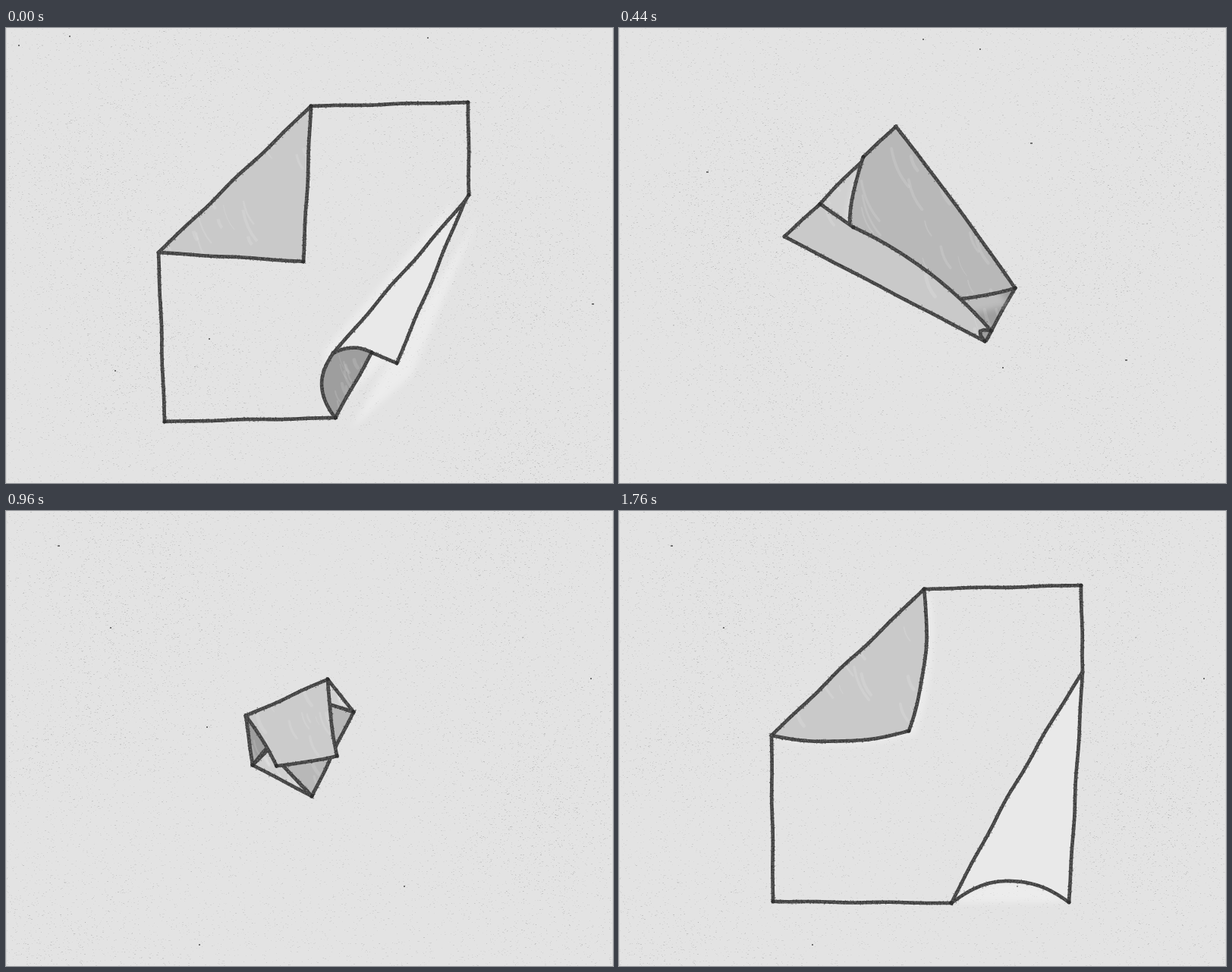
Animation of 800x600 px, one loop 1.8 s. Source, as an HTML page with a canvas:

```html
<!DOCTYPE html>
<html lang="en">
<head>
<meta charset="utf-8">
<title>Folding paper</title>
<style>
  html, body { margin: 0; width: 100%; height: 100%; overflow: hidden; background: #e2e2e2; }
  canvas { display: block; width: 800px; height: 600px; }
</style>
</head>
<body>
<canvas id="stage" width="800" height="600"></canvas>
<script>
const LOOP = 1800, WALLS = 4;
const PAPER = '#e2e2e2', LIFTED = '#e9e9e9', LIGHT = '#d0d0d0';
const BACK = '#c9c9c9', MID = '#b8b8b8', SHADE = '#9e9e9e', INK = '#474747';
const ctx = document.getElementById('stage').getContext('2d');
let rand = seeded(1);

function seeded(seed) {
  let s = seed * 7919 + 17;
  return () => {
    s = (s + 0x6D2B79F5) | 0;
    let t = Math.imul(s ^ (s >>> 15), 1 | s);
    t = (t + Math.imul(t ^ (t >>> 7), 61 | t)) ^ t;
    return ((t ^ (t >>> 14)) >>> 0) / 4294967296;
  };
}

const spread = n => (rand() - 0.5) * 2 * n;
const mix = (a, b, p) => a + (b - a) * p;
const mixPt = (a, b, p) => [0, 1, 2].map(i => mix(a[i] || 0, b[i] || 0, p));
const mixAll = (from, to, p) => from.map((pt, i) => mixPt(pt, to[i], p));
const bent = (pt, bulge) => [pt[0], pt[1], bulge];

// A point is [x, y, bulge]; bulge bends the edge to the next point, to the right of travel.
function control(a, b) {
  const dx = b[0] - a[0], dy = b[1] - a[1];
  const k = 2 * (a[2] || 0) / (Math.hypot(dx, dy) || 1);
  return [(a[0] + b[0]) / 2 - dy * k, (a[1] + b[1]) / 2 + dx * k];
}

function trace(pts) {
  ctx.beginPath();
  ctx.moveTo(pts[0][0], pts[0][1]);
  pts.forEach((a, i) => {
    const b = pts[(i + 1) % pts.length];
    ctx.quadraticCurveTo(...control(a, b), b[0], b[1]);
  });
  ctx.closePath();
}

// Charcoal stroke: a slightly wavering line with rough grain on top.
function inkEdge(a, b, width) {
  const c = control(a, b);
  const len = Math.hypot(b[0] - a[0], b[1] - a[1]);
  const n = Math.max(2, Math.round(len / 4));
  const phase = rand() * 6, amp = Math.min(0.6, len / 200);
  const line = [];
  for (let i = 0; i <= n; i++) {
    const t = i / n, s = 1 - t;
    const w = amp * Math.sin(phase + t * len / 17) * Math.sin(Math.PI * t);
    line.push([0, 1].map(j => s * s * a[j] + 2 * s * t * c[j] + t * t * b[j] + w));
  }
  ctx.strokeStyle = INK;
  ctx.lineWidth = width;
  ctx.beginPath();
  line.forEach(p => ctx.lineTo(...p));
  ctx.stroke();
  for (const p of line) {
    for (let j = 0; j < 5; j++) {
      const dark = j < 3, r = dark ? width * 0.62 : 1.6;
      ctx.fillStyle = dark ? 'rgba(50,50,50,.6)' : 'rgba(150,150,150,.4)';
      ctx.fillRect(p[0] + spread(r) - 0.5, p[1] + spread(r) - 0.5, 1.2, 1.2);
    }
  }
  ctx.fillStyle = 'rgba(25,25,25,.55)';
  ctx.beginPath();
  ctx.arc(a[0], a[1], width * 0.55, 0, 7);
  ctx.fill();
}

function ink(pts, closed, width = 4.6) {
  ctx.lineCap = ctx.lineJoin = 'round';
  const n = pts.length - (closed ? 0 : 1);
  for (let i = 0; i < n; i++) inkEdge(pts[i], pts[(i + 1) % pts.length], width);
}

function streaks(pts) {
  const xs = pts.map(p => p[0]), ys = pts.map(p => p[1]);
  const x0 = Math.min(...xs), y0 = Math.min(...ys);
  const w = Math.max(...xs) - x0, h = Math.max(...ys) - y0;
  ctx.save();
  ctx.clip();
  ctx.strokeStyle = 'rgba(255,255,255,.12)';
  for (let i = 0; i < 24; i++) {
    const x = x0 + rand() * w, y = y0 + rand() * h, len = 8 + rand() * h * 0.2;
    ctx.lineWidth = 1 + rand() * 4;
    ctx.beginPath();
    ctx.moveTo(x, y);
    ctx.quadraticCurveTo(x + len * 0.1, y + len * 0.6, x + len * 0.45, y + len);
    ctx.stroke();
  }
  ctx.restore();
}

function face(pts, fill) {
  trace(pts);
  ctx.fillStyle = fill;
  ctx.fill();
  if (fill !== PAPER && fill !== LIFTED) streaks(pts);
  ink(pts, true);
}

// Pale, soft patch where paper is raised from the wall.
function glow(pts, dx = 0, dy = 0) {
  ctx.save();
  ctx.filter = 'blur(4px)';
  ctx.translate(dx, dy);
  ctx.fillStyle = 'rgba(255,255,255,.32)';
  trace(pts);
  ctx.fill();
  ctx.restore();
}

function makeWall(seed) {
  const c = document.createElement('canvas');
  c.width = 800;
  c.height = 600;
  const g = c.getContext('2d');
  rand = seeded(40 + seed);
  const speck = (x, y, alpha, size = 1) => {
    g.fillStyle = `rgba(40,40,40,${alpha})`;
    g.fillRect(Math.floor(x), Math.floor(y), size + (rand() < 0.3), size);
  };
  g.fillStyle = '#e3e3e3';
  g.fillRect(0, 0, 800, 600);
  for (let n = 0; n < 12000; n++) speck(rand() * 800, rand() * 600, 0.03 + rand() * 0.07);
  for (let p = 0; p < 12; p++) {
    const x = (p % 2 ? 40 : 560) + rand() * 200, y = rand() * 600;
    for (let n = 0; n < 450; n++) {
      speck(x + (spread(1) + spread(1)) * 85, y + (spread(1) + spread(1)) * 70, 0.04 + rand() * 0.12);
    }
  }
  for (let n = 0; n < 6; n++) speck(rand() * 800, rand() * 600, 0.6, 2);
  g.fillStyle = '#d6d6d6';
  g.fillRect(0, 0, 1, 600);
  g.fillRect(799, 0, 1, 600);
  return c;
}

const walls = Array.from({ length: WALLS }, (_, i) => makeWall(i));

// Key points of the sheet and of the finished bundle
const topRight = [609, 98], bottomLeft = [206, 518];
const foldTop = [402, 103], foldLeft = [201, 296], foldTip = [392, 308];
const apex = [365, 130], elbow = [522, 343], foot = [427, 512];
const peak = [360, 135];
const hingeL = [316, 270], hingeR = [424, 222], side = [458, 265];
const toe = [403, 376], heel = [325, 335], tuckTop = [405, 248], tuckLow = [345, 315];

// Every pose takes its progress p, from 0 to 1.

function stamp() {
  for (let i = 0; i < 4; i++) {
    const w = 410, h = i % 2 ? 9.5 : 6.5;
    ctx.save();
    ctx.translate(403, 305.5);
    ctx.rotate(i * Math.PI / 2);
    ctx.translate(-w / 2, -202 - h / 2);
    ctx.fillStyle = '#0c0c0c';
    ctx.beginPath();
    ctx.roundRect(0, 0, w, h, 2);
    ctx.fill();
    for (let n = 0; n < 420; n++) {
      ctx.fillStyle = `rgba(210,210,210,${0.08 + rand() * 0.35})`;
      ctx.fillRect(rand() * w, rand() * h, 0.6 + rand(), 0.6 + rand());
    }
    ctx.fillStyle = PAPER;
    for (let n = 0; n < 16; n++) {
      ctx.beginPath();
      ctx.arc(rand() * w, rand() < 0.5 ? 0 : h, 0.8 + rand() * 1.4, 0, 7);
      ctx.fill();
    }
    ctx.restore();
  }
}

// Top-left corner folded by p; loose keeps its tip curling off the sheet.
function corner(p, loose) {
  const start = [200, 103];
  const a = mixPt(start, foldTop, p), b = mixPt(start, foldLeft, p);
  const tip = mixPt(start, foldTip, p);
  const flap = [bent(a, -11 * loose), [tip[0] - 10 * loose, tip[1] - 18 * loose, -11 * loose], b];
  if (loose) glow(flap, 9, 5);
  face(flap, BACK);
  return [a, b];
}

function square(p) {
  const [a, b] = corner(p * 0.85, 0.8);
  ink([a, topRight, [606, 512], [203, 513], b]);
}

// Bottom-right corner rising along a crease that moves inwards.
function lift(p) {
  const [a, b] = corner(mix(0.88, 1, p), 1);
  const from = [606, 512];
  const top = mixPt(from, [611, 212], p), end = mixPt(from, [438, 517], p);
  const tip = mixPt(from, [593, 516, 29], p);
  glow([tip, end]);
  face([top, tip, bent(end, -4)], LIFTED);
  ink([a, topRight, top]);
  ink([end, [203, 515], b]);
}

function curl() {
  const [a, b] = corner(1, 0);
  const top = [605, 228], end = [434, 514], tip = [515, 442], lip = [482, 428], roll = [431, 429];
  glow([top, tip, end, roll], -12, -4);
  glow([top, tip, end, lip], 20, 16);
  face([top, tip, bent(lip, 6), roll], LIFTED);
  face([bent(roll, -7), lip, bent(end, -16)], SHADE);
  ink([a, topRight, [610, 220], top]);
  ink([end, [209, 519], b]);
}

function turned(p) {
  const [a, b] = corner(1, 0);
  const top = [605, 225], end = [432, 514];
  face([top, end, bent(mixPt([515, 442], [380, 362], p), -6 * (1 - p))], SHADE);
  ink([a, topRight, top]);
  ink([end, bottomLeft, b]);
}

// Top-right corner folding down across the sheet.
function house(p) {
  face([foldLeft, apex, foldTip], LIGHT);
  face([elbow, foot, [377, 360]], SHADE);
  ink([foot, [206, 520], foldLeft]);
  const flap = mixAll(
    [apex, foldTop, topRight, [605, 225], elbow],
    [apex, [322, 170, 8], [306, 305, 5], [385, 354, 8], bent(elbow, 2)], p);
  if (p > 0.5) glow(flap, -8, 22 * p);
  face(flap, p < 0.5 ? PAPER : MID);
}

// Bottom half folding up until it covers the rest.
function foldUp(p) {
  const left = [218, 275], right = [482, 413];
  const along = t => mixPt(left, right, t).slice(0, 2);
  ctx.save();
  ctx.beginPath();
  [along(-2), along(3), [1000, -100], [-400, -100]].forEach(pt => ctx.lineTo(...pt));
  ctx.clip();
  house(1);
  ctx.restore();
  const bend = Math.sin(Math.PI * p) * 14;
  const flap = mixAll([left, foldLeft, bottomLeft, foot, right], [left, [297, 200], peak, elbow, right], p);
  flap[2][2] = -bend;
  flap[3][2] = bend;
  face(flap, p < 0.45 ? PAPER : BACK);
}

// Both side wings wrapping inwards.
function wings(p) {
  const [A, W, B, C, Q, P, D] = mixAll(
    [[297, 200, 16], [218, 275, -20], [325, 343], [408, 383], [482, 413, 18], [522, 345], [470, 283, -15]],
    [[309, 212], [412, 232], heel, toe, tuckLow, tuckTop, side], p);
  glow([W, bent(B, 6)], -2, 2);
  glow([Q, bent(C, 0)]);
  face([peak, bent(D, 0), C, B, bent(A, 0)], BACK);
  face([A, W, B], p < 0.5 ? BACK : SHADE);
  face([D, P, Q, C], p < 0.5 ? BACK : MID);
}

function bundle() {
  face([tuckTop, side, toe, tuckLow], MID);
  face([hingeR, side, tuckTop], LIGHT);
  face([tuckLow, toe, heel], LIGHT);
  face([hingeL, [411, 232], heel], SHADE);
}

const rim = [[358, 180], [287, 217]];

function tuck() {
  const [far, near] = rim, under = [289, 249];
  bundle();
  glow([bent(far, 9), bent(hingeR, 9)]);
  face([bent(under, 8), hingeR, bent(hingeL, 3)], '#b0b0b0');
  face([near, bent(far, 9), bent(hingeR, -8), bent(under, -5)], '#c6c6c6');
}

function shut(p) {
  bundle();
  const [far, near] = mixAll(rim, [[440, 330], [360, 342]], p);
  face([hingeL, bent(hingeR, 2 * p), bent(far, 9 - 11 * p), bent(near, 2 * p)], '#cbcbcb');
}

function unfold(p) {
  const shape = mixAll([hingeL, hingeR, side, toe, heel],
    [[200, 104], [605, 104], [605, 300], [605, 507], [200, 507]], p);
  trace(shape);
  ctx.fillStyle = `rgba(200,200,200,${1 - p})`;
  ctx.fill();
  ink(shape, true, 5 + 2 * p);
}

// Each phase draws `count` pictures, one per `hold` ms, then keeps the last.
const linear = p => p, settle = p => 1 - (1 - p) ** 6;
const phase = (at, pose, wall, count = 1, opts = {}) =>
  ({ at, pose, wall, count, hold: 40, turn: 3, ease: linear, ...opts });
const phases = [
  phase(0, curl, 1),
  phase(80, turned, 3, 2),
  phase(200, house, 0, 3),
  phase(320, foldUp, 1, 3, { hold: 80 }),
  phase(560, wings, 0, 1, { ease: () => 0 }),
  phase(640, wings, 2, 3),
  phase(760, tuck, 3),
  phase(840, shut, 1, 10, { ease: settle }),
  phase(1240, unfold, 0, 2, { turn: 0, ease: p => p * 0.9 }),
  phase(1320, stamp, 0),
  phase(1520, stamp, 1),
  phase(1560, square, 2, 3),
  phase(1680, lift, 3, 2, { hold: 80 })
];

const start = performance.now();
let shown = '';

function frame() {
  const t = (performance.now() - start) % LOOP;
  const i = phases.findLastIndex(ph => ph.at <= t);
  const { at, pose, wall, count, hold, turn, ease } = phases[i];
  const n = Math.min(count - 1, Math.floor((t - at) / hold));
  const key = i + ':' + n;
  if (key !== shown) {
    shown = key;
    ctx.drawImage(walls[(wall + turn * n) % WALLS], 0, 0);
    rand = seeded(pose === stamp ? 5 : at + n);
    pose(ease((n + 1) / count));
  }
  requestAnimationFrame(frame);
}
frame();
</script>
</body>
</html>
```
